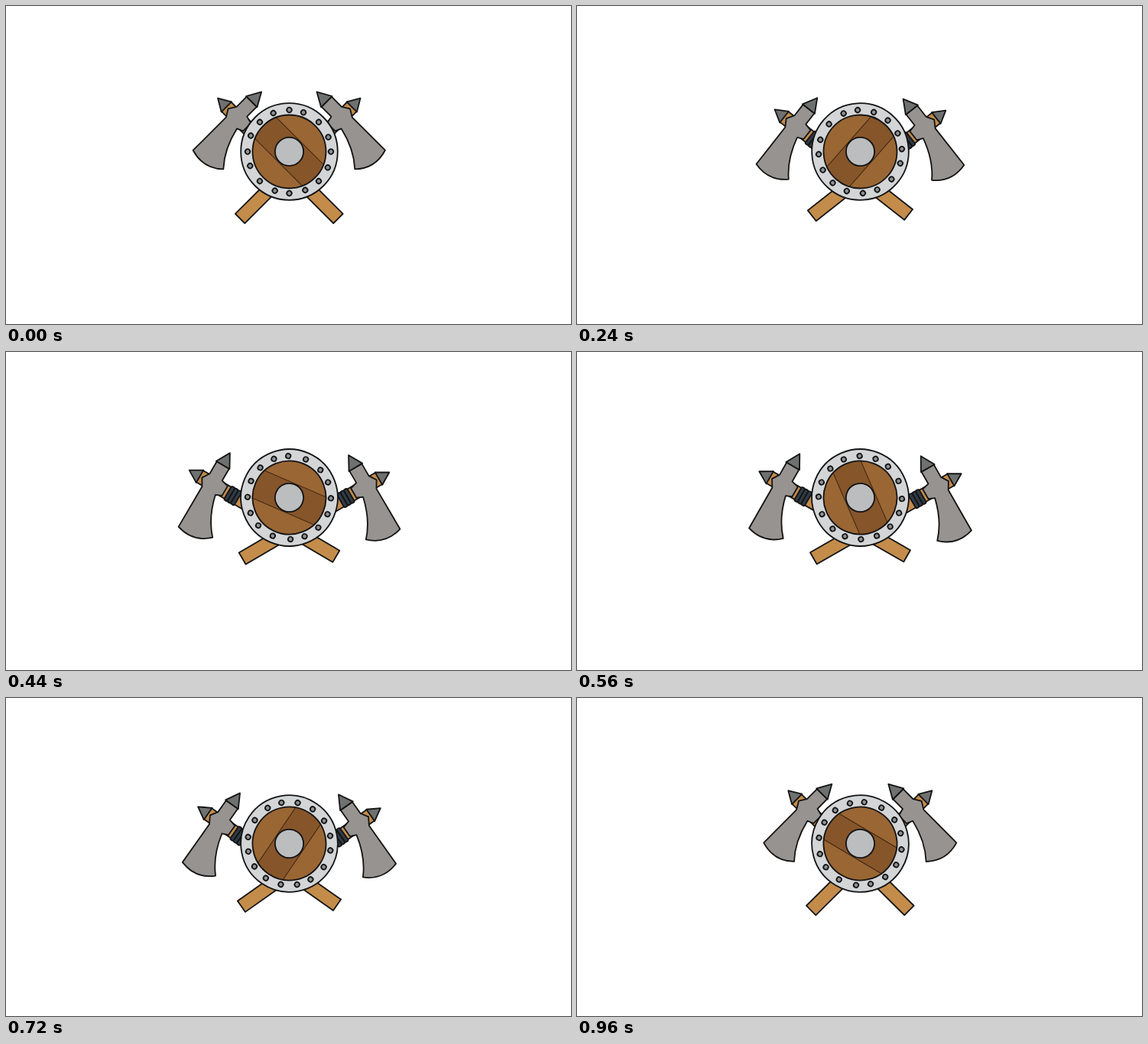
Write an HTML page that moves like this. It is 739 px wide and 416 px high and loops after 1 s.

```html
<!DOCTYPE html>
<html lang="en">
<head>
<meta charset="utf-8">
<title>Shield and axes</title>
<style>
  html, body { margin: 0; width: 100%; height: 100%; overflow: hidden; background: #fff; }
  svg { display: block; width: 739px; height: 416px; }
  .ink { stroke: #131313; stroke-width: 1.8; stroke-linejoin: round; }
  .haft { fill: #c38c4a; }
  .steel { fill: #979390; }
  .spike { fill: #6f7070; }
  .wrap { fill: #2f3b46; }
  .rim { fill: #d3d5d7; }
  .wood { fill: #9a6633; }
  .plank { fill: #86552a; stroke: #3a2411; stroke-width: 1; }
  .boss { fill: #bbbdbf; }
  .rivet { fill: #8f9294; }
</style>
</head>
<body>
<svg viewBox="0 0 739 416">
  <defs>
    <clipPath id="disc"><circle r="48"/></clipPath>
    <!-- upright axe: origin at the foot of the haft, blade to the left -->
    <g id="axe" class="ink" transform="translate(434.2 277.8) rotate(-45)">
      <path class="haft" d="M-8.8 .4H8.8V-207H-8.8Z"/>
      <path class="spike" d="M-9.4 -206.3H9.4L0 -222.3Z"/>
      <g class="wrap">
        <rect x="-10.3" y="-164" width="20.6" height="5.2" rx="2"/>
        <rect x="-10.3" y="-158.8" width="20.6" height="5.2" rx="2"/>
        <rect x="-10.3" y="-153.6" width="20.6" height="5.2" rx="2"/>
      </g>
      <path class="steel" d="M28 -197H9.5L0 -203L-10 -197H-71
        Q-79 -171 -60.5 -151.5Q-41 -169.5 -10.5 -176.5L-7 -168.5H7.5L10 -178.3H28Z"/>
      <path class="spike" d="M28 -198V-177.6L46.3 -187.8Z"/>
    </g>
  </defs>
  <g id="left"><use href="#axe"/></g>
  <g transform="translate(740.6 0) scale(-1 1)">
    <g id="right"><use href="#axe"/></g>
  </g>
  <g transform="translate(370.5 190.5)">
    <g id="shield">
      <circle class="rim ink" r="63.3"/>
      <circle class="wood" r="48"/>
      <rect class="plank" x="-60" y="-19.7" width="120" height="39.4" clip-path="url(#disc)"/>
      <circle class="ink" r="48" fill="none"/>
      <circle class="boss ink" r="18.6"/>
      <g id="rivets" class="rivet ink"></g>
    </g>
  </g>
</svg>
<script>
  const byId = id => document.getElementById(id);
  const shield = byId('shield'), left = byId('left'), right = byId('right');
  const LOOP = 1000, STEP = 40, PEAK = 520, SWING = 15.5;

  // Sixteen rivets, a few of them set slightly off the even spacing
  const nudge = { 1: -2.6, 3: 2.1, 9: -2.3, 11: 2.5 };
  for (let i = 0; i < 16; i++) {
    const a = (i * 22.5 + (nudge[i] || 0) - 135) * Math.PI / 180;
    const c = document.createElementNS('http://www.w3.org/2000/svg', 'circle');
    c.setAttribute('cx', 54.5 * Math.cos(a));
    c.setAttribute('cy', 54.5 * Math.sin(a));
    c.setAttribute('r', 3.2);
    byId('rivets').append(c);
  }

  const ease = p => (1 - Math.cos(Math.PI * p)) / 2;
  const turn = (el, deg, x = 0, y = 0) =>
    el.setAttribute('transform', `rotate(${deg} ${x} ${y})`);

  function draw(now) {
    // The motion advances in 40 ms steps
    const t = Math.floor((now % LOOP) / STEP + 0.001) * STEP;
    const swing = SWING * ease(t < PEAK ? t / PEAK : (LOOP - t) / (LOOP - PEAK));
    turn(shield, 45 + 360 * t / LOOP);
    turn(left, -swing, 391, 283);
    turn(right, -swing, 402, 286);
  }

  function loop(now) {
    draw(now);
    requestAnimationFrame(loop);
  }
  draw(0);
  requestAnimationFrame(loop);
</script>
</body>
</html>
```
